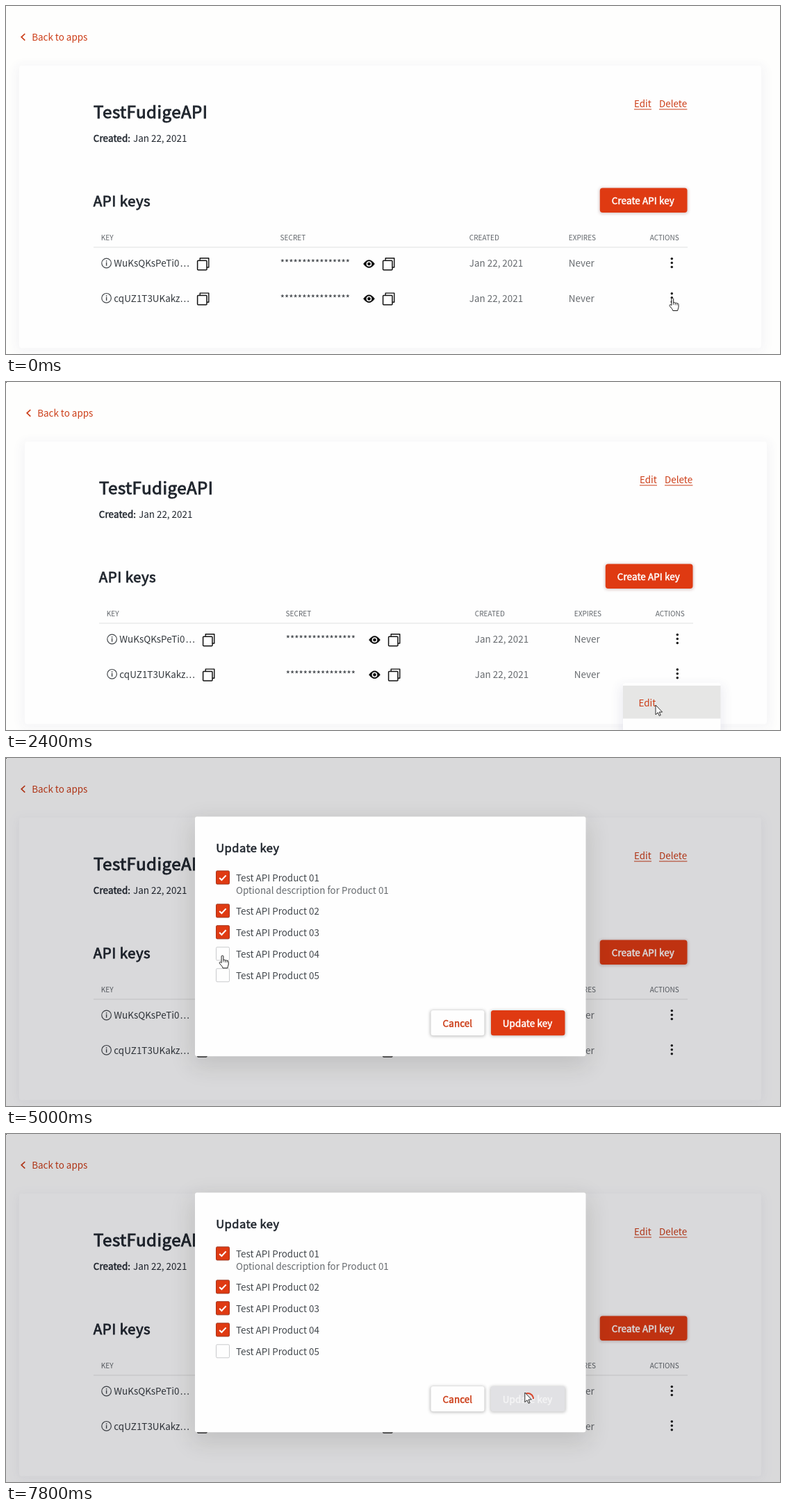
Write an HTML page that moves like this. It is 1114 by 502 pixels and loops after 8000 ms.

```html
<!DOCTYPE html>
<html lang="en">
<head>
<meta charset="utf-8">
<title>API keys</title>
<style>
  html, body { margin: 0; width: 100%; height: 100%; overflow: hidden; background: #fefefd; }
  svg { display: block; width: 100vw; height: 100vh; }
  text { font-family: 'Noto Sans CJK JP', 'Noto Sans CJK SC', 'Noto Sans CJK', sans-serif; font-weight: 400; white-space: pre; }
</style>
</head>
<body>
<svg id="stage" viewBox="0 0 1114 502" preserveAspectRatio="none">
  <defs>
    <filter id="soft" x="-20%" y="-20%" width="140%" height="140%"><feGaussianBlur stdDeviation="8"/></filter>
    <filter id="wide" x="-20%" y="-20%" width="140%" height="140%"><feGaussianBlur stdDeviation="17"/></filter>
    <filter id="tight" x="-20%" y="-50%" width="140%" height="200%"><feGaussianBlur stdDeviation="2"/></filter>
    <filter id="glow" x="-30%" y="-80%" width="160%" height="260%"><feGaussianBlur stdDeviation="6"/></filter>
  </defs>
  <g id="page"></g>
  <g id="modal"></g>
  <g id="cursor" stroke="#1b1b1b" stroke-linejoin="round" fill="#fff">
    <path id="arrow" stroke-width="1.1" transform="scale(.84)" d="M0 0V16.5L3.8 12.9 6.2 18.4 8.6 17.4 6.2 12H11.4Z"/>
    <g id="hand" transform="translate(-5.4 -.5)">
      <path d="M4 1.5C4 .2 6.8 .2 6.8 1.5V7.2C7.2 6.3 9.2 6.4 9.4 7.6 10 6.9 11.6 7.1 11.9 8.2 12.6 7.7 14.1 8 14.1 9.4V13.5C14.1 15.2 12.7 16.5 12.7 18.5H5.9C5.9 16.8 3.6 14.6 1.7 12.3 .2 10.5 2 9 3.2 10.2L4 11Z"/>
      <path d="M6.8 7V10M9.4 7.6V10.4M11.9 8.2V10.6" fill="none" stroke-width=".8"/>
    </g>
  </g>
  <rect id="corner" width="1" height="1" fill="#333"/>
</svg>
<script>
const LOOP = 8000, STEP = 200;
const RED = '#df3a12', LINK = '#cc3d17', INK = '#20262e', GREY = '#666a6e';
const EM = 1 / 1.117; // this family draws its Latin letters larger per em
const $ = id => document.getElementById(id);

const attrs = o => Object.entries(o).map(([k, v]) => `${k}="${v}"`).join(' ');
const rect = (x, y, w, h, fill, more = {}) =>
  `<rect ${attrs({ x, y, width: w, height: h, fill, ...more })}/>`;
const text = (x, y, s, fill = '#33383d', size = 15, more = {}) =>
  `<text ${attrs({ x, y, fill, 'font-size': (size * EM).toFixed(2), ...more })}>${s}</text>`;
const semi = (x, y, s, fill, size, spacing, weight = size * 0.034) =>
  text(x, y, s, fill, size, { stroke: fill, 'stroke-width': weight.toFixed(2), 'letter-spacing': spacing });
const path = (d, stroke, width, more = {}) =>
  `<path ${attrs({ d, stroke, 'stroke-width': width, fill: 'none', ...more })}/>`;

function link(x, s, w) {
  return text(x, 145.5, s, LINK) + rect(x, 148.5, w, 1, LINK);
}

function copyIcon(x, y) {
  return path(`M${x + 3.6} ${y + 3}V${y}H${x + 16.2}V${y + 13.2}H${x + 13.4}`, '#111', 1.4, { 'stroke-linejoin': 'round' }) +
    rect(x, y + 3.4, 13.4, 13.6, '#fefefe', { stroke: '#111', 'stroke-width': 1.5, rx: 1 });
}

function eyeIcon(x, y) {
  return `<path d="M${x - 8.3} ${y}Q${x} ${y - 11.5} ${x + 8.3} ${y}Q${x} ${y + 11.5} ${x - 8.3} ${y}Z" fill="#0b0b0b"/>` +
    `<circle cx="${x}" cy="${y}" r="3.1" fill="#0b0b0b" stroke="#fefefe" stroke-width="1.5"/>`;
}

function infoIcon(x, y) {
  return `<circle cx="${x}" cy="${y}" r="6.8" fill="none" stroke="#45494d" stroke-width="1.2"/>` +
    rect(x - .7, y - 1.5, 1.4, 5.2, '#45494d') + rect(x - .7, y - 4, 1.4, 1.5, '#45494d');
}

function keyRow(y, key) {
  const base = y + 5.2;
  const dots = [-6, 0, 6].map(d => `<circle cx="958.3" cy="${y + d - .5}" r="1.75" fill="#1c1c1c"/>`).join('');
  return infoIcon(144.6, y) + text(155.3, base, key) +
    text(250.8, base, '...', '#33383d', 15, { 'letter-spacing': 1 }) +
    copyIcon(275.6, y - 7.2) +
    text(394.8, base, '*'.repeat(16)) +
    eyeIcon(522.5, y + 1) + copyIcon(542.6, y - 7.2) +
    text(666.8, base, 'Jan 22, 2021', GREY) + text(809.8, base, 'Never', GREY) + dots;
}

function drawPage() {
  const heads = [[136.8, 'KEY'], [394.6, 'SECRET'], [666.8, 'CREATED'], [809.8, 'EXPIRES'], [926.8, 'ACTIONS']];
  return rect(15, 86, 1076, 412, '#3a3a78', { filter: 'url(#soft)', opacity: .05 }) +
    rect(19, 86, 1068, 407.5, '#fefefe', { rx: 4 }) +
    path('M27.3 40L22.2 44.8L27.3 49.6', LINK, 1.7) +
    text(37.2, 50.2, 'Back to apps', LINK) +
    link(904, 'Edit', 25) + link(940, 'Delete', 40.4) +
    semi(126, 162, 'TestFudigeAPI', INK, 27, .42) +
    semi(125.8, 196.3, 'Created:', INK, 15, .1, .45) + text(183, 196.3, 'Jan 22, 2021', INK) +
    semi(125.8, 289, 'API keys', INK, 23, .42) +
    rect(854, 262.5, 127.5, 37, '#7a4040', { rx: 4, filter: 'url(#tight)', opacity: .3 }) +
    rect(854.8, 262.5, 125.7, 35.5, RED, { rx: 4 }) +
    semi(871.8, 286.3, 'Create API key', '#fff', 15, .1) +
    heads.map(([x, s]) => text(x, 338.2, s, '#60656a', 11.25)).join('') +
    rect(126, 347.5, 855, 1, '#e0e1e2') +
    keyRow(371, 'WuKsQKsPeTi0') + keyRow(421.3, 'cqUZ1T3UKakz') +
    `<g id="menu">` +
    rect(884, 438, 148, 90, '#3a3a78', { filter: 'url(#soft)', opacity: .09 }) +
    rect(888, 434, 140.5, 80, '#fefefe', { rx: 3 }) +
    rect(888, 438, 140.5, 47.5, '#e6e6e5', { id: 'hover' }) +
    text(910.5, 467.6, 'Edit', '#33383d', 15, { id: 'menuEdit' }) + `</g>`;
}

const BOXES = [172.4, 220.4, 251.3, 282.4, 313.3];

function checkbox(y, i) {
  const top = y - 9.5;
  return rect(302.5, top, 19, 19, '#fefefe', { stroke: '#c9cacc', rx: 1.5 }) +
    `<g id="tick${i}">` + rect(302.5, top, 19, 19, RED, { stroke: '#a8331a', rx: 1.5 }) +
    path(`M307.2 ${y + .5}L310.4 ${y + 3.6}L316.6 ${y - 3}`, '#fff', 2.1) + `</g>` +
    text(331, y + 5.4, `Test API Product 0${i + 1}`, '#42474c');
}

function drawModal() {
  return rect(0, 0, 1114, 502, 'rgb(6,6,14)', { opacity: .145 }) +
    rect(268, 92, 570, 352, '#1a1a10', { filter: 'url(#wide)', opacity: .13 }) +
    rect(272, 84.5, 562.5, 345.7, '#fefefe', { rx: 3 }) +
    semi(302.2, 136, 'Update key', INK, 18.5, .42) +
    BOXES.map(checkbox).join('') +
    text(331, 195.8, 'Optional description for Product 01', GREY) +
    rect(610.5, 364, 79, 37.5, '#555', { rx: 4, filter: 'url(#tight)', opacity: .4 }) +
    rect(611.5, 364, 77, 36.3, '#fefefe', { rx: 3.5 }) +
    semi(628.6, 387.6, 'Cancel', LINK, 15, .1) +
    rect(697, 366, 109, 37, '#444', { id: 'lift', rx: 4, filter: 'url(#glow)', opacity: .45 }) +
    rect(697, 364, 108.5, 37.5, '#555', { rx: 4, filter: 'url(#tight)', opacity: .35 }) +
    rect(698, 364, 106.5, 36.3, RED, { id: 'submit', rx: 3.5 }) +
    `<g id="submitText">` + semi(714.8, 387.6, 'Update key', 'currentColor', 15, .1) + `</g>` +
    `<circle id="spinner" cx="751" cy="382" r="8" fill="none" stroke="#d9452a" stroke-width="2" stroke-dasharray="15.4 60"/>`;
}

$('page').innerHTML = drawPage();
$('modal').innerHTML = drawModal();

// pointer moves: start, end, x, y
const MOVES = [
  [800, 1600, 935, 466], [2400, 2600, 937, 465], [3000, 3400, 896, 408],
  [3400, 4200, 312, 254], [4600, 5000, 311.5, 285], [5400, 6200, 741, 376], [6400, 6800, 746.8, 373]
];
const ease = u => u * u * (3 - 2 * u);

function pointer(t) {
  let x = 959.3, y = 421.5;
  for (const [a, b, tx, ty] of MOVES) {
    const k = ease(Math.min(1, Math.max(0, (t - a) / (b - a))));
    x += (tx - x) * k;
    y += (ty - y) * k;
  }
  return [x, y];
}

const within = (t, a, b = LOOP) => t >= a && t < b;
const show = (id, on) => $(id).setAttribute('visibility', on ? 'inherit' : 'hidden');

function render(t) {
  const menu = within(t, 800, 2600), hover = within(t, 1200, 2600);
  const enabled = within(t, 4400, 6600);
  const hand = t < 1000 || within(t, 4200, 5600) || within(t, 6000, 6600);

  $('page').setAttribute('transform', `translate(${menu ? 8 : 0} 0)`);
  $('menu').setAttribute('transform', 'translate(-8 0)');
  show('menu', menu);
  show('hover', hover);
  $('menuEdit').setAttribute('fill', hover ? LINK : '#33383d');

  show('modal', t >= 2600);
  [0, 0, 4400, 5200, LOOP].forEach((at, i) => show('tick' + i, t >= at));
  $('submit').setAttribute('fill', enabled ? RED : '#e1e1e4');
  $('submitText').setAttribute('color', enabled ? '#fff' : '#f4f4f5');
  show('lift', within(t, 6000, 6600));
  show('spinner', t >= 6800);
  $('spinner').setAttribute('transform', `rotate(${-110 + (t - 7800) * .45} 751 382)`);

  const [x, y] = pointer(t);
  $('cursor').setAttribute('transform', `translate(${x.toFixed(1)} ${y.toFixed(1)})`);
  show('hand', hand);
  show('arrow', !hand);
  show('corner', within(t, 400, 2600) || t >= 2800);
}

const start = performance.now();
let last = -1;
function tick() {
  const t = Math.floor((performance.now() - start) % LOOP / STEP) * STEP;
  if (t !== last) render(last = t);
  requestAnimationFrame(tick);
}
tick();
</script>
</body>
</html>
```
